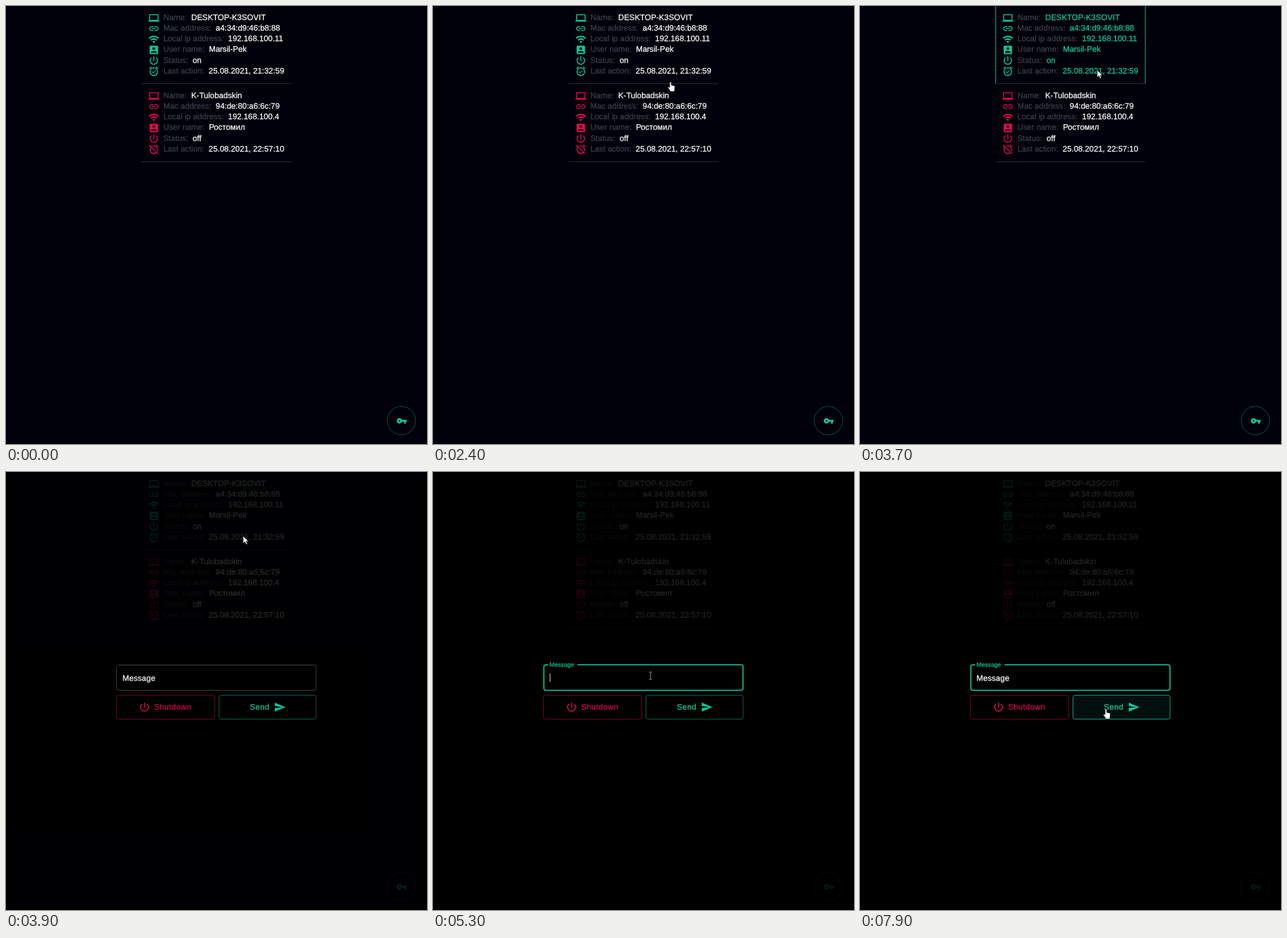
An HTML page that plays this animation: 600 px wide and 623 px high, repeating every 8000 ms.

```html
<!DOCTYPE html>
<html lang="en">
<head>
<meta charset="utf-8">
<title>Devices</title>
<style>
html, body { margin: 0; width: 100%; height: 100%; overflow: hidden; background: #00000a; }
svg { display: block; width: 600px; height: 623px; }
text {
  font: 11.4px "Liberation Sans", Arial, sans-serif; white-space: pre;
  text-rendering: geometricPrecision;
  fill: currentColor; stroke: currentColor; stroke-width: .25;
}
.label { color: #3d3d45; }
.button { letter-spacing: .0286em; }
.frame { fill: none; }
</style>
</head>
<body>
<svg id="stage" viewBox="0 0 600 623"></svg>
<script>
const GREEN = '#10c99b', RED = '#e8064f', LOOP = 8000;
const ICONS = {
  laptop: 'M20 18c1.1 0 2-.9 2-2V6c0-1.1-.9-2-2-2H4c-1.1 0-2 .9-2 2v10c0 1.1.9 2 2 2H0v2h24v-2zM4 6h16v10H4z',
  link: 'M3.9 12c0-1.71 1.39-3.1 3.1-3.1h4V7H7c-2.76 0-5 2.24-5 5s2.24 5 5 5h4v-1.9H7c-1.71 0-3.1-1.39-3.1-3.1zM8 13h8v-2H8zm9-6h-4v1.9h4c1.71 0 3.1 1.39 3.1 3.1s-1.39 3.1-3.1 3.1h-4V17h4c2.76 0 5-2.24 5-5s-2.24-5-5-5z',
  wifi: 'M1 9l2 2c4.97-4.97 13.03-4.97 18 0l2-2C16.93 2.93 7.08 2.93 1 9zm8 8l3 3 3-3c-1.65-1.66-4.34-1.66-6 0zm-4-4l2 2c2.76-2.76 7.24-2.76 10 0l2-2C15.14 9.14 8.87 9.14 5 13z',
  user: 'M3 5v14c0 1.1.89 2 2 2h14c1.1 0 2-.9 2-2V5c0-1.1-.9-2-2-2H5c-1.11 0-2 .9-2 2zm12 4c0 1.66-1.34 3-3 3s-3-1.34-3-3 1.34-3 3-3 3 1.34 3 3zm-9 8c0-2 4-3.1 6-3.1s6 1.1 6 3.1v1H6z',
  power: 'M13 3h-2v10h2zm4.83 2.17l-1.42 1.42C17.99 7.86 19 9.81 19 12c0 3.87-3.13 7-7 7s-7-3.13-7-7c0-2.19 1.01-4.14 2.58-5.42L6.17 5.17C4.23 6.82 3 9.26 3 12c0 4.97 4.03 9 9 9s9-4.03 9-9c0-2.74-1.23-5.18-3.17-6.83z',
  alarmOn: 'M22 5.72l-4.6-3.86-1.29 1.53 4.6 3.86zM7.88 3.39L6.6 1.86 2 5.71l1.29 1.53zM12 4c-4.97 0-9 4.03-9 9s4.02 9 9 9c4.97 0 9-4.03 9-9s-4.03-9-9-9zm0 16c-3.87 0-7-3.13-7-7s3.13-7 7-7 7 3.13 7 7-3.13 7-7 7zm-1.46-5.47L8.41 12.4l-1.06 1.06 3.18 3.18 6-6-1.06-1.06z',
  alarmOff: 'M12 6c3.87 0 7 3.13 7 7 0 .84-.16 1.65-.43 2.4l1.52 1.52c.58-1.19.91-2.51.91-3.92 0-4.97-4.03-9-9-9-1.41 0-2.73.33-3.92.91L9.6 6.43C10.35 6.16 11.16 6 12 6zm10-.28l-4.6-3.86-1.29 1.53 4.6 3.86zM2.92 2.29L1.65 3.57 2.98 4.9l-1.11.93 1.42 1.42 1.11-.94.8.8C3.83 8.69 3 10.75 3 13c0 4.97 4.02 9 9 9 2.25 0 4.31-.83 5.89-2.2l2.2 2.2 1.27-1.27L3.89 3.27zm13.55 16.1C15.26 19.39 13.7 20 12 20c-3.87 0-7-3.13-7-7 0-1.7.61-3.26 1.61-4.47zM8.02 3.28L6.6 1.86l-.86.71 1.42 1.42z',
  key: 'M12.65 10C11.83 7.67 9.61 6 7 6c-3.31 0-6 2.69-6 6s2.69 6 6 6c2.61 0 4.83-1.67 5.65-4H17v4h4v-4h2v-4zM7 14c-1.1 0-2-.9-2-2s.9-2 2-2 2 .9 2 2-.9 2-2 2z',
  send: 'M2 21L23 12 2 3v7l15 2-15 2z'
};
const FIELDS = [
  ['Name:', 264], ['Mac address:', 298.8], ['Local ip address:', 316.6],
  ['User name:', 289.2], ['Status:', 266], ['Last action:', 288.8]
];

// An icon centred on (x, y)
const icon = (name, x, y, size, color) =>
  `<path d="${ICONS[name]}" fill="${color}" transform="translate(${x - size / 2} ${y - size / 2}) scale(${size / 24})"/>`;

function card(top, color, alarm, values) {
  const icons = ['laptop', 'link', 'wifi', 'user', 'power', alarm];
  const rows = FIELDS.map(([label, x], i) => {
    const y = top + 15.15 * i;
    return icon(icons[i], 210.7, y + 17, 16, color) +
      `<text class="label" x="224.2" y="${y + 20}">${label}</text>` +
      `<text class="value" x="${x}" y="${y + 20}">${values[i]}</text>`;
  });
  return `<g color="#fff">${rows.join('')}</g><path d="M193 ${top + 110.5}h214" stroke="#26262e"/>`;
}

const stage = document.getElementById('stage');
stage.innerHTML = `
  <rect width="600" height="623" fill="#00000a"/>
  <g id="first">${card(0, GREEN, 'alarmOn', ['DESKTOP-K3SOVIT', 'a4:34:d9:46:b8:88', '192.168.100.11', 'Marsil-Pek', 'on', '25.08.2021, 21:32:59'])}</g>
  ${card(111, RED, 'alarmOff', ['K-Tulobadskin', '94:de:80:a6:6c:79', '192.168.100.4', 'Ростомил', 'off', '25.08.2021, 22:57:10'])}
  <path id="sides" d="M193.5 0V110M406.5 0V110" stroke="${GREEN}" stroke-opacity=".8"/>
  <circle cx="563.5" cy="589.7" r="20.2" fill="none" stroke="#085044"/>
  ${icon('key', 564, 590, 15.5, GREEN)}
  <g id="modal">
    <rect width="600" height="623" fill="#000" fill-opacity=".87"/>
    <rect id="idle" class="frame" x="157.5" y="274.5" width="284.5" height="36" rx="3" stroke="#3b3b3b"/>
    <path id="focus" class="frame" d="M206 274.2H439q2.8 0 2.8 2.8V307.6q0 2.8-2.8 2.8H160.8q-2.8 0-2.8-2.8V277q0-2.8 2.8-2.8H164" stroke="${GREEN}" stroke-width="1.5"/>
    <text id="hint" letter-spacing=".1">Message</text>
    <text id="typed" x="166" y="296.5" color="#fff" letter-spacing=".1"></text>
    <rect id="caret" y="286.5" width="1" height="12" fill="#ccc"/>
    <rect class="frame" x="157.5" y="317.5" width="140" height="34" rx="3" stroke="${RED}" stroke-opacity=".45"/>
    ${icon('power', 197.5, 334.3, 17.1, RED)}
    <text class="button" x="211" y="338.3" color="#d0054a">Shutdown</text>
    <rect id="send" x="303.5" y="317.5" width="138.5" height="34" rx="3" fill="${GREEN}" stroke="${GREEN}"/>
    <text class="button" x="347.6" y="338.3" color="${GREEN}">Send</text>
    ${icon('send', 390.2, 334.4, 17.1, GREEN)}
  </g>
  <g id="pointer">
    <path id="arrow" d="M0 0V10.6L2.5 8.3 4.2 12.2 6 11.4 4.4 7.7H7.6Z" fill="#fff" stroke="#000" stroke-width=".6"/>
    <path id="hand" d="M-1.2.8Q0-.8 1.2.8V4.5L5 5.3Q6.4 5.8 6.3 7.4L5.7 11V13.6H-.8V12L-3.6 8.2Q-3.8 6.6-2.2 7.1L-1.2 8Z" fill="#fff" stroke="#000" stroke-width=".6"/>
    <path id="beam" d="M-2-5H-.5L0-4.5.5-5H2M0-4.5V5M-2 5.5H-.5L0 5 .5 5.5H2" fill="none" stroke="#bbb" stroke-width=".8"/>
  </g>`;

const $ = Object.fromEntries([...stage.querySelectorAll('[id]')].map(el => [el.id, el]));
const values = $.first.querySelectorAll('.value');
const PATH = [
  [500, 574, 586], [1000, 437, 300], [1100, 435, 297], [1950, 435, 297], [2400, 338.5, 108],
  [2700, 338, 91], [3900, 338, 91], [4200, 334, 132], [4500, 326, 238], [4800, 310, 289.5],
  [7300, 310, 289.5], [7700, 350.5, 337.5]
];
const KEYS = [6000, 6200, 6400, 6600, 6750, 6900, 7100];
const FOCUS = 5050, OPEN = 3700;

const ramp = (t, from, to) => Math.min(1, Math.max(0, (t - from) / (to - from)));
const mix = (a, b, k) => a + (b - a) * k;
const ease = k => k * k * (3 - 2 * k);
const show = (el, opacity) => el.setAttribute('opacity', +opacity);
const blend = (a, b, k) => `rgb(${a.map((v, i) => Math.round(mix(v, b[i], k)))})`;

function pointerAt(t) {
  const i = PATH.findIndex(p => p[0] > t);
  if (i === 0) return PATH[0].slice(1);
  if (i < 0) return PATH[PATH.length - 1].slice(1);
  const [t0, x0, y0] = PATH[i - 1], [t1, x1, y1] = PATH[i], k = ease(ramp(t, t0, t1));
  return [mix(x0, x1, k), mix(y0, y1, k)];
}

function pointerKind(t, x, y) {
  if (t < OPEN - 50) {
    const overCard = x > 193 && x < 407 && y < 221;
    const overKey = Math.hypot(x - 563.5, y - 589.7) < 20;
    return overCard || overKey ? 'hand' : 'arrow';
  }
  if (y > 274 && y < 311) return 'beam';
  return y > 317 ? 'hand' : 'arrow';
}

function draw(now) {
  const t = now % LOOP;

  const hover = ramp(t, 2420, 2750) * (1 - ramp(t, OPEN + 20, OPEN + 250));
  values.forEach(el => el.setAttribute('color', blend([255, 255, 255], [16, 201, 155], hover)));
  show($.sides, hover);
  show($.modal, ease(ramp(t, OPEN, OPEN + 225)));

  const focused = t >= FOCUS, lift = ease(ramp(t, FOCUS, FOCUS + 200));
  show($.idle, !focused);
  show($.focus, focused);
  $.hint.setAttribute('transform', `translate(166 ${mix(296.5, 277.2, lift)}) scale(${mix(1, .75, lift)})`);
  $.hint.setAttribute('color', focused ? GREEN : '#fff');

  const count = KEYS.filter(k => k <= t).length;
  $.typed.textContent = 'Message'.slice(0, count);
  $.caret.setAttribute('x', 166.3 + (count ? $.typed.getComputedTextLength() : 0));
  const blinkStart = count ? KEYS[count - 1] : FOCUS;
  show($.caret, focused && (t - blinkStart) % 1000 < 500);

  const [x, y] = pointerAt(t), kind = pointerKind(t, x, y);
  $.pointer.setAttribute('transform', `translate(${x} ${y})`);
  show($.pointer, t >= PATH[0][0]);
  for (const name of ['arrow', 'hand', 'beam']) show($[name], name === kind);

  const sendHover = ramp(t, 7550, 7800);
  $.send.setAttribute('fill-opacity', .08 * sendHover);
  $.send.setAttribute('stroke-opacity', mix(.45, .75, sendHover));

  requestAnimationFrame(draw);
}
requestAnimationFrame(draw);
</script>
</body>
</html>
```
